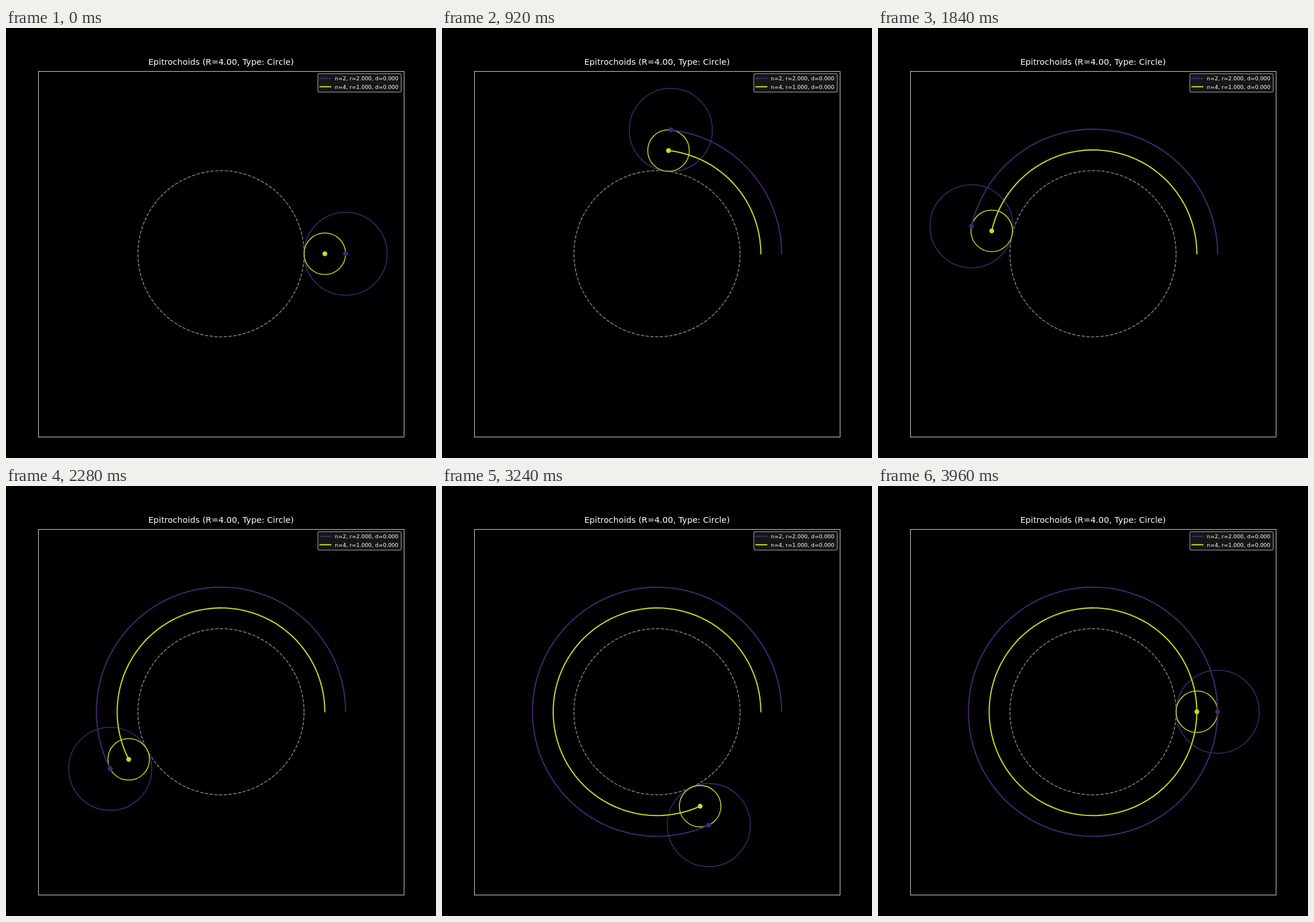
Write an HTML page that moves like this. It is 748 px wide and 748 px high and loops after 4 s.

```html
<!DOCTYPE html>
<html lang="en">
<head>
<meta charset="utf-8">
<title>Epitrochoids</title>
<style>
  html, body { margin: 0; width: 100%; height: 100%; overflow: hidden; background: #000; }
  svg { display: block; width: 100%; height: 100%; }
  text { font-family: "DejaVu Sans", sans-serif; fill: #fff; white-space: pre; }
</style>
</head>
<body>
<svg id="stage" viewBox="0 0 748 748">
  <rect width="748" height="748"/>
  <g id="plot" fill="none">
    <path d="M518.5 392.7A144.5 144.5 0 0 0 229.5 392.7A144.5 144.5 0 0 0 518.5 392.7"
      stroke="#808080" stroke-width="1.56" stroke-dasharray="5.77 2.49"/>
  </g>
  <rect x="56.5" y="75.5" width="636" height="636" fill="none" stroke="#fff" stroke-width=".83"/>
  <text x="374" y="64" font-size="14.54" text-anchor="middle">Epitrochoids (R=4.00, Type: Circle)</text>
  <rect x="542.5" y="79.5" width="145" height="32" rx="1.9" fill="#161616" stroke="#a3a3a3" stroke-width="1.04"/>
  <g id="legend" font-size="9.35"></g>
</svg>
<script>
const CX = 374, CY = 392.7, UNIT = 36.125, R = 4;
const STEPS = 100, STEP_MS = 40;

function add(parent, tag, attrs) {
  const el = document.createElementNS("http://www.w3.org/2000/svg", tag);
  for (const key in attrs) el.setAttribute(key, attrs[key]);
  return parent.appendChild(el);
}

const plot = document.getElementById("plot");
const legend = document.getElementById("legend");
const curves = [
  { n: 2, color: "#482475", lineY: 87.7, textY: 91 },
  { n: 4, color: "#bddf26", lineY: 102.2, textY: 106 }
];

for (const c of curves) {
  c.r = R / c.n;
  c.ring = add(plot, "circle", { r: c.r * UNIT, stroke: c.color, "stroke-width": 1.56 });
  add(legend, "path", {
    d: `M546.2 ${c.lineY}h18.7`, stroke: c.color, "stroke-width": 2.08, "stroke-linecap": "square"
  });
  add(legend, "text", { x: 572, y: c.textY }).textContent =
    `n=${c.n}, r=${c.r.toFixed(3)}, d=0.000`;
}
for (const c of curves) {
  c.trail = add(plot, "polyline", {
    stroke: c.color, "stroke-width": 2.08, "stroke-linecap": "square", "stroke-linejoin": "round"
  });
  c.dot = add(plot, "circle", { r: 4.2, fill: c.color });
}

// Centre of the rolling circle at a given step.
function centre(c, step) {
  const a = 2 * Math.PI * step / (STEPS - 1);
  const dist = (R + c.r) * UNIT;
  return [CX + dist * Math.cos(a), CY - dist * Math.sin(a)];
}

function draw(step) {
  for (const c of curves) {
    const points = Array.from({ length: step + 1 }, (_, i) => centre(c, i));
    const [x, y] = points[step];
    for (const el of [c.ring, c.dot]) {
      el.setAttribute("cx", x);
      el.setAttribute("cy", y);
    }
    c.trail.setAttribute("points", step ? points.join(" ") : "");
  }
}

let start = null;
function tick(now) {
  if (start === null) start = now;
  draw(Math.floor((now - start) / STEP_MS) % STEPS);
  requestAnimationFrame(tick);
}
draw(0);
requestAnimationFrame(tick);
</script>
</body>
</html>
```
